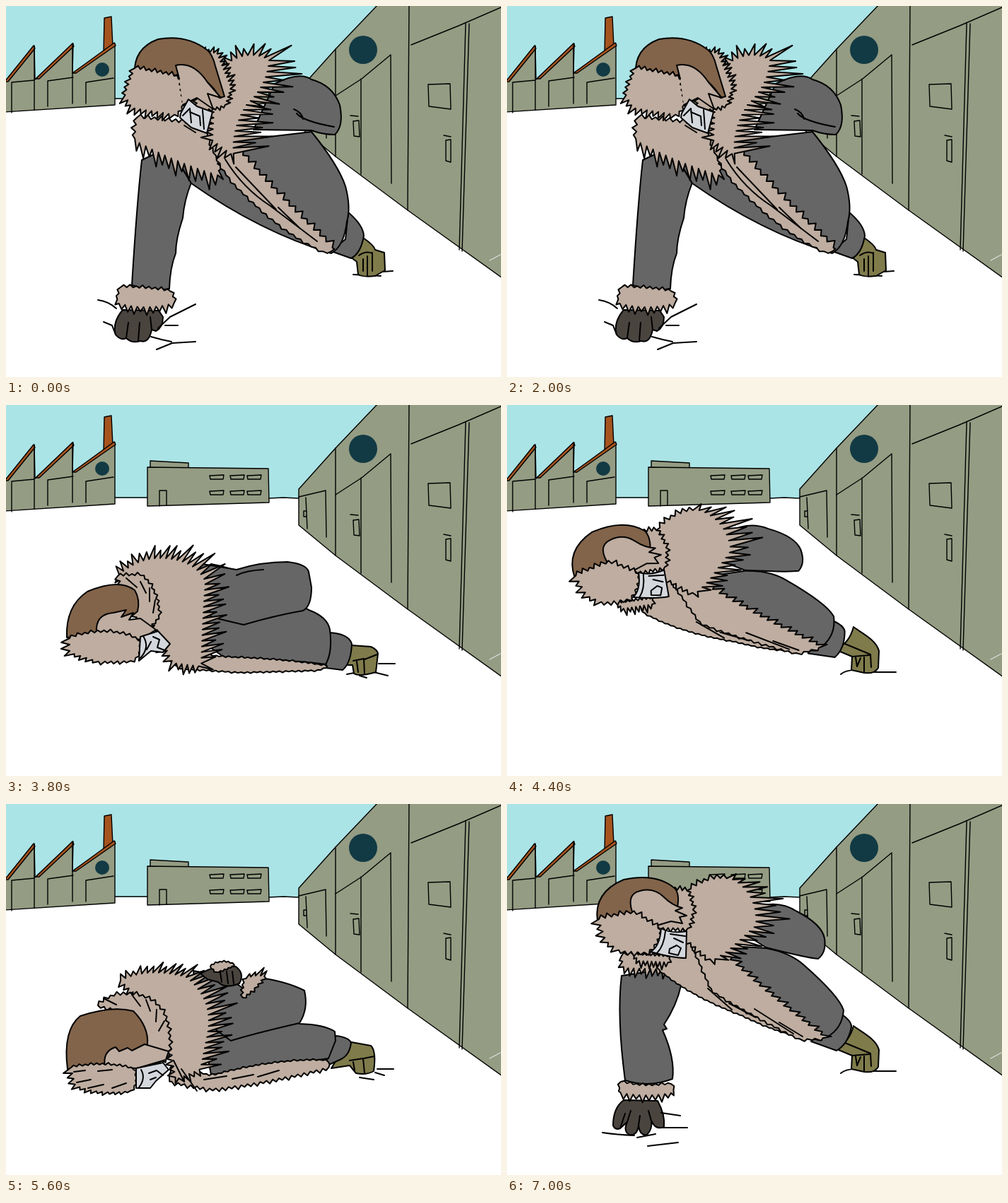
Write an HTML page with a canvas that moves like this. It is 700 by 525 pixels and loops after 7100 ms.

```html
<!DOCTYPE html>
<html lang="en">
<head>
<meta charset="utf-8">
<title>Push-ups in the snow</title>
<style>
html, body { margin: 0; width: 100%; height: 100%; overflow: hidden; background: #fff; }
canvas { display: block; width: 100vw; height: 100vh; }
</style>
</head>
<body>
<canvas id="stage" width="700" height="525"></canvas>
<script>
const ctx = document.getElementById('stage').getContext('2d');
const tracer = document.createElementNS('http://www.w3.org/2000/svg', 'path');
const coat = '#666666', pelt = '#beada0', hood = '#82644a', skin = '#d4d7dc',
  boot = '#7f7b4b', glove = '#4a443f', wall = '#949c83', rust = '#a6541e';
const cache = new Map();

function cached(key, make) {
  if (!cache.has(key)) cache.set(key, new Path2D(make()));
  return cache.get(key);
}

function ink(d, fill) {
  const path = cached(d, () => d);
  if (fill) {
    ctx.fillStyle = fill;
    ctx.fill(path);
  }
  ctx.stroke(path);
}

// Grows spikes on a clockwise outline: outward by `length`, plus a lean where the edge faces it.
function spikes(d, length, leanX, leanY, step) {
  tracer.setAttribute('d', d);
  const total = tracer.getTotalLength();
  const count = Math.round(total / step);
  const reach = Math.hypot(leanX, leanY) || 1;
  let out = '';
  for (let i = 0; i < count; i++) {
    const a = tracer.getPointAtLength(total * i / count);
    const b = tracer.getPointAtLength(total * (i + 1) / count);
    const size = Math.hypot(b.x - a.x, b.y - a.y) || 1;
    const nx = (b.y - a.y) / size, ny = (a.x - b.x) / size;
    const facing = Math.max(0, (nx * leanX + ny * leanY) / reach);
    const vary = 0.85 + 0.25 * Math.sin(i * 2.4);
    const x = (a.x + b.x) / 2 + (nx * length + leanX * facing) * vary;
    const y = (a.y + b.y) / 2 + (ny * length + leanY * facing) * vary;
    out += `${i ? 'L' : 'M'}${a.x} ${a.y}L${x} ${y}`;
  }
  return out + 'Z';
}

function fur(d, length, leanX = 0, leanY = 0, step = 9) {
  const path = cached([d, length, leanX, leanY], () => spikes(d, length, leanX, leanY, step));
  ctx.fillStyle = pelt;
  ctx.fill(path);
  ctx.stroke(path);
}

function dot(x, y, r) {
  ctx.fillStyle = '#123a44';
  ctx.beginPath();
  ctx.arc(x, y, r, 0, 7);
  ctx.fill();
}

function drawScenery() {
  ctx.fillStyle = '#fff';
  ctx.fillRect(0, 0, 700, 525);
  ctx.fillStyle = '#abe4e6';
  ctx.fillRect(0, 0, 700, 132);
  ctx.strokeStyle = '#000';
  ctx.lineWidth = 1.4;
  ink('M154 131H200M371 132L392 131 414 132');
  drawFactory();
  drawOffice();
  drawHangars();
  dot(136, 90, 10);
  dot(505, 62, 20);
  ctx.lineWidth = 2;
}

function drawFactory() {
  ink('M139 17L149 15 151 57 138 66Z', rust);
  ink('M-2 108L40 56 41 104 95 53 94 95 154 53V140L-2 150Z', wall);
  for (const [x, y, w, h] of [[-2, 107, 42, 51], [42, 103, 53, 50], [94, 95, 60, 43]])
    ink(`M${x} ${y}l${w - 1} ${-h}l2 4l${-w + 4} ${h - 4}Z`, rust);
  ink('M40 57V147M8 151V108L40 105M59 142V106L95 101M94 53V138M113 138V108L152 102');
}

function drawOffice() {
  ink('M204 90V79L258 82V90Z', wall);
  ink('M200 88L371 90 372 138 200 143Z', wall);
  ink('M217 143V121H227V142');
  for (const x of [288, 317, 341])
    for (const y of [100, 122]) ink(`M${x} ${y}l20 -1l-1 6l-18 0Z`);
}

function drawHangars() {
  ink('M414 119L466 61 526 -2H702V385L568 289 466 213 414 170Z', wall);
  ink('M466 61V213M570 0L568 289M414 130L452 121 453 187M424 131L426 175M421 150H425V158H421Z');
  ink('M466 127L503 103 544 69 545 251M502 103V238M487 155L498 156M491 163L499 162 500 185 492 184Z');
  ink('M573 55L640 28 700 2M650 25L641 345M655 25L645 347M597 111L628 110 629 146 598 142Z');
  ink('M619 183L629 185M622 190L629 189V221L622 219Z');
  ctx.strokeStyle = '#ddd';
  ink('M684 360L699 352');
  ctx.strokeStyle = '#000';
}

function drawUp() {
  ink('M491 380L530 382M533 376L547 375');
  ink('M505 328Q520 338 522 345L535 349 536 374 522 382Q505 384 498 380L496 362 487 355Z', boot);
  ink('M499 353Q509 346 518 350M511 354V381M518 349V375M505 358V375');
  ink('M484 292Q505 310 506 325Q502 350 488 357L460 347 480 330Z', coat);
  ink('M330 190L432 178Q470 225 480 255Q488 285 482 305Q478 340 460 350Q360 320 262 251L235 205Z', coat);
  ink('M380 110Q415 92 432 104Q462 112 472 140Q478 170 465 182Q448 182 432 176L350 175Z', coat);
  ink('M407 146Q418 150 420 160M411 152Q420 163 464 171');
  fur('M185 158L290 170 302 240Q240 222 182 190Z', 6, 5, 20, 10);
  fur('M285 178L330 205Q375 262 466 346L452 349Q390 320 340 268Q300 235 285 178Z', 3, 4, -3, 12);
  ink('M310 217Q335 258 374 283L440 333M325 228L382 288M385 285L416 315');
  fur('M296 110L318 78Q345 62 372 76Q370 112 340 140Q318 175 322 212L292 190Z', 16, 36, -6, 8);
  fur('M270 66L298 66 318 115 310 140 270 150Z', 5, 5, -4, 6);
  ink('M182 96Q180 60 215 47Q255 40 284 62Q292 68 296 85L309 128 302 130Q290 105 258 92L240 98Z', hood);
  fur('M182 88L243 100 250 140 240 154 178 144 168 125Z', 5, -5, 6, 8);
  ink('M245 103L240 84Q265 78 285 108L304 130 285 124 293 146 270 130 250 140', pelt);
  ink('M247 152L258 132 270 142 292 150 284 180 262 172 246 158Z', skin);
  ink('M250 155L260 145 262 165M260 150L274 156 275 169M278 147L280 174M252 169L268 179');
}

function drawMidFoot() {
  ink('M472 381Q480 374 500 375M500 378H550');
  ink('M490 314C500 322 522 332 526 348L525 372Q520 381 505 379L487 375 488 356 464 346Q484 338 490 314Z', boot);
  ink('M478 338L514 353 515 371M488 356L513 354M493 357L495 370 500 358M505 357V378');
}

function drawMidBody() {
  ink('M474 298Q488 308 487 316Q482 340 466 349L430 336 440 322Z', coat);
  ink('M300 200L366 204Q400 210 420 228Q470 272 476 292Q474 318 452 330L360 290 300 220Z', coat);
  ink('M355 145Q385 136 410 152Q445 170 449 190Q452 210 440 219Q425 218 366 203L330 180Z', coat);
  fur('M225 205L258 190 320 275 445 334Q390 328 335 300Q255 270 210 230Z', 1.5);
  fur('M258 190L300 205Q355 260 450 331L415 333Q330 290 290 264Z', 3, 16, 2, 11);
  ink('M284 261L318 291M314 282L352 302M350 290L405 325M385 309L418 329');
  fur('M260 120Q295 98 322 108Q355 130 352 172L312 208 290 222 252 190Z', 7, 38, 1, 9);
  fur('M220 120L255 123 263 150 256 176 215 175 190 150Z', 6, 0, 0, 7);
  drawMidHead();
}

function drawMidHead() {
  ink('M128 166Q122 125 165 107Q212 97 238 120Q245 130 240 150L205 174Z', hood);
  ink('M205 174L180 160Q166 128 188 123Q207 118 221 131Q234 144 248 147L238 151 254 158 244 160 248 169 232 166Z', pelt);
  fur('M180 213L230 216 228 224 186 222Z', 4, 0, 6, 6);
  fur('M130 163L180 154 217 178Q210 205 195 210L160 208 140 194Z', 6, -6, 0, 9);
  ink('M218 176Q232 184 254 180L253 218Q235 218 203 209Q216 202 218 176Z', skin);
  ink('M224 180Q222 201 212 211M231 184L252 187M230 205L240 200 246 204 242 214 229 211ZM236 190L249 196');
}

function drawMid() {
  drawMidFoot();
  drawMidBody();
}

function drawBetween() {
  drawMidFoot();
  ctx.save();
  ctx.translate(505, 365);
  ctx.rotate(-0.2);
  ctx.translate(-505, -365);
  drawMidBody();
  ctx.restore();
}

function drawLow() {
  ink('M482 381L498 378M500 383L510 386M527 366H550M520 378L540 383');
  ink('M488 340L516 342Q525 346 526 352L523 378Q500 385 492 380L490 368H475Z', boot);
  ink('M491 362L506 359 507 380M496 363L498 378M507 360L525 353');
  ink('M458 322Q485 324 489 338Q488 365 476 375L452 372Z', coat);
  ink('M290 225Q350 235 428 290Q455 300 458 318Q462 350 452 367Q400 360 310 358L270 330Z', coat);
  ink('M272 224L326 233Q360 222 398 222Q425 225 428 236L432 258Q432 285 420 291Q380 298 336 311L290 300Z', coat);
  ink('M326 241Q340 234 364 233');
  fur('M230 358Q250 350 310 357Q400 360 456 370L440 375 330 378 245 372Z', 2);
  fur('M160 240Q190 214 225 217Q268 220 282 250Q278 300 276 370L236 365 215 320 180 260Z', 14, 20, -10, 8);
  fur('M158 242L190 241Q214 258 216 300L195 322 180 290Z', 4, -4, 0, 8);
  ink('M170 245L185 258M190 250L198 266M203 259V278M211 276L208 294');
  ink('M86 329Q84 285 115 264Q160 245 182 262Q190 275 186 292L150 322Z', hood);
  ink('M128 322Q126 296 152 294L170 290 163 300 180 294 174 304 190 302 212 318 190 332Z', pelt);
  fur('M90 330Q145 312 186 332Q194 352 178 362L130 363 90 350Z', 4, -12, 2, 9);
  ink('M190 328L215 320 232 338 222 350 205 348 188 362Z', skin);
  ink('M194 327Q204 343 190 358M208 328L217 332 214 343 224 347M199 346L205 335');
}

function drawBottom() {
  ink('M525 375H548M522 380L535 384M500 387L520 390');
  ink('M483 336L516 342Q524 350 520 378Q510 384 495 381L486 370 460 374Z', boot);
  ink('M486 363L505 360 507 381M491 365L493 377M506 360L521 357');
  ink('M466 328Q485 330 488 338Q486 355 474 361L450 372Z', coat);
  ink('M290 245Q340 270 415 311Q450 312 465 322L466 335 456 360Q380 372 290 383L280 330Z', coat);
  ink('M265 236Q320 245 340 265L352 245Q395 250 422 264Q428 290 415 310Q350 325 318 335L270 300Z', coat);
  fur('M235 370L290 385Q380 360 455 363L458 372Q350 398 290 403L230 392Z', 2, 0, 3);
  fur('M162 250Q200 230 255 245Q292 275 286 320L275 375 240 390 228 310Z', 10, 28, -10, 8);
  ink('M237 363L252 393M248 375L270 406M280 390L312 385M320 389L350 383M356 386L386 377');
  ink('M275 240Q300 226 325 230Q338 240 330 254Q310 262 300 252L285 248Z', glove);
  fur('M289 230Q305 218 324 228L298 238Z', 2, 0, 0, 6);
  ink('M303 238L305 252M312 237L314 254M320 237L322 254');
  fur('M335 274L337 248 350 243 366 243 352 260Z', 4, 12, -10, 7);
  drawBottomHead();
}

function drawBottomHead() {
  fur('M130 285L150 272Q205 262 224 300Q236 340 226 360L200 372 180 295Z', 5);
  ink('M138 275L156 284M178 270L190 286M198 277L204 293M213 291L212 308M224 307L216 321');
  ink('M87 375Q80 320 105 300Q150 285 180 293Q202 315 200 340L140 370Z', hood);
  ink('M140 372Q136 350 155 344L160 350 172 345 178 349 196 340 230 350 226 362 185 374Z', pelt);
  fur('M92 373Q140 364 180 375Q188 395 176 406Q130 412 98 398Z', 3, -8, 3, 8);
  ink('M96 379L112 377M100 394L120 390M116 402L138 397M130 378L150 376M150 402L170 395');
  ink('M184 374L222 366 230 376 212 392 204 402H184Z', skin);
  ink('M191 376Q198 388 188 401M202 381L213 377 222 384M204 390L212 387');
}

function drawPlantedHand() {
  ink('M165 419Q150 430 150 455Q153 462 160 459L170 450Q164 463 173 468Q184 470 186 455Q188 470 198 468Q206 460 204 448Q210 462 222 457Q224 440 213 420Z', glove);
  ink('M160 459L167 438M170 450L175 434M186 455L188 441M204 448L200 434');
  fur('M161 393Q190 402 232 396L237 408Q195 416 158 408Z', 3, 0, 7);
  ink('M135 465Q155 468 180 469M184 472L210 467M218 437L245 441M218 458H255M199 484L242 479');
}

function drawShoulderFur() {
  fur('M162 215Q200 207 230 216L226 234 165 232Z', 5, -2, 8, 8);
}

function armUp() {
  ink('M192 218Q185 280 178 395Q205 405 231 400Q232 370 240 350Q240 330 250 300Q252 275 262 250L230 200Z', coat);
  ink('M165 430Q150 448 155 465Q162 474 170 470Q178 478 190 474Q202 478 206 458L212 460Q222 455 222 440L216 431Z', glove);
  ink('M170 470L173 448M187 474L189 448M206 458L204 440');
  fur('M162 398Q195 398 234 404L238 420Q200 432 156 420Z', 4, 0, 7);
  ink('M130 416Q145 418 156 428M138 447L150 452 155 465M268 422L232 440 215 456M225 452H243');
  ink('M205 468L220 472 234 475M213 486L235 477 268 475');
}

function armMid() {
  ink('M162 243Q155 300 167 391Q200 402 234 389Q238 360 220 320L226 318 222 312Q240 285 246 257L215 235Z', coat);
  drawPlantedHand();
  drawShoulderFur();
}

function armLow() {
  ink('M170 340Q162 370 167 391Q200 402 234 389L236 345Z', coat);
  drawPlantedHand();
}

function armRaised() {
  ink('M165 235Q145 265 140 290Q138 320 163 365L209 362Q208 330 200 296L206 287Q220 275 246 258L225 235Z', coat);
  ink('M168 388Q155 415 157 440Q160 449 167 450Q170 458 180 455Q188 462 201 458Q199 430 204 402Q212 420 222 419Q230 415 226 405L215 380Z', glove);
  ink('M168 450L172 428M180 455L182 430M188 458L190 430');
  fur('M163 369L210 366 218 378 164 384Z', 3, 0, 4, 8);
  drawShoulderFur();
}

// One letter per 100 ms: Up, Mid, In between, Low, Bottom, Raised hand; lower case has no arm in front.
const withArm = 'UUMILBBLIM', noArm = 'uumilbblim';
const timeline = withArm.repeat(2) + 'UUMILBBLIR' + 'm' + noArm.repeat(3) + 'umRILBBLIM';
const bodies = { u: drawUp, m: drawMid, r: drawMid, i: drawBetween, l: drawLow, b: drawBottom };
const arms = { U: armUp, M: armMid, I: armMid, L: armLow, B: armLow, R: armRaised };

ctx.lineJoin = ctx.lineCap = 'round';
const start = performance.now();

function frame() {
  const time = (performance.now() - start) % 7100;
  const pose = timeline[Math.floor(time / 100)];
  drawScenery();
  arms[pose]?.();
  bodies[pose.toLowerCase()]();
  requestAnimationFrame(frame);
}
frame();
</script>
</body>
</html>
```
